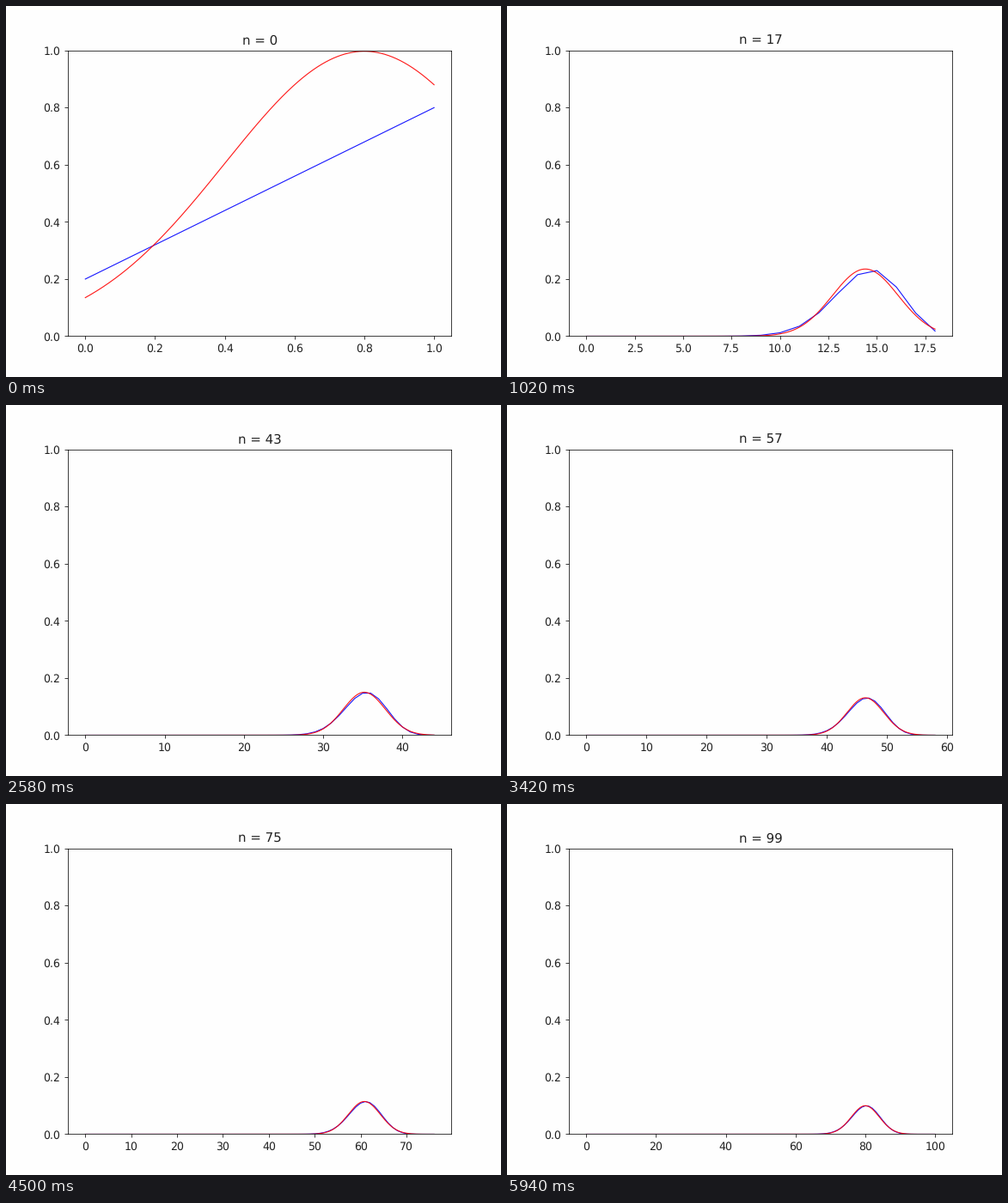
Write a matplotlib script that moves like this. It is 576x432 px and loops after 6000 ms.

```python
"""A binomial distribution approaching its normal approximation."""
from math import comb

import numpy as np
import matplotlib.pyplot as plt
from matplotlib.animation import FuncAnimation

P = 0.8
FRAMES = 100
INTERVAL = 60
INK = "#222222"
FRAME_ALPHA = 0.75

# Soft, unhinted lettering and a slightly translucent frame.
plt.rcParams.update({
    "font.family": "DejaVu Sans",
    "text.hinting": "none",
    "text.color": INK,
    "xtick.labelcolor": INK,
    "ytick.labelcolor": INK,
    "xtick.color": (0, 0, 0, FRAME_ALPHA),
    "ytick.color": (0, 0, 0, FRAME_ALPHA),
    "axes.edgecolor": (0, 0, 0, FRAME_ALPHA),
    "figure.facecolor": "#fefefe",
    "axes.facecolor": "#fefefe",
})


def binomial(trials):
    k = np.arange(trials + 1)
    probs = [comb(trials, i) * P**i * (1 - P)**(trials - i) for i in range(trials + 1)]
    return k, probs


def normal(trials):
    x = np.linspace(0, trials, 1000)
    mean, var = trials * P, trials * P * (1 - P)
    return x, np.exp(-(x - mean)**2 / (2 * var)) / np.sqrt(2 * np.pi * var)


fig, ax = plt.subplots(figsize=(6.4, 4.8), dpi=90)
ax.set_ylim(0, 1)
exact, = ax.plot([], [], color="blue", lw=0.9, alpha=0.9)
approx, = ax.plot([], [], color="red", lw=0.9, alpha=0.9)
title = ax.set_title("n = 0")


def update(n):
    trials = n + 1
    exact.set_data(*binomial(trials))
    approx.set_data(*normal(trials))
    ax.set_xlim(-0.05 * trials, 1.05 * trials)
    title.set_text(f"n = {n}")
    return exact, approx, title


anim = FuncAnimation(fig, update, frames=FRAMES, interval=INTERVAL,
                     repeat=True, repeat_delay=0, blit=False)
plt.show()
```
